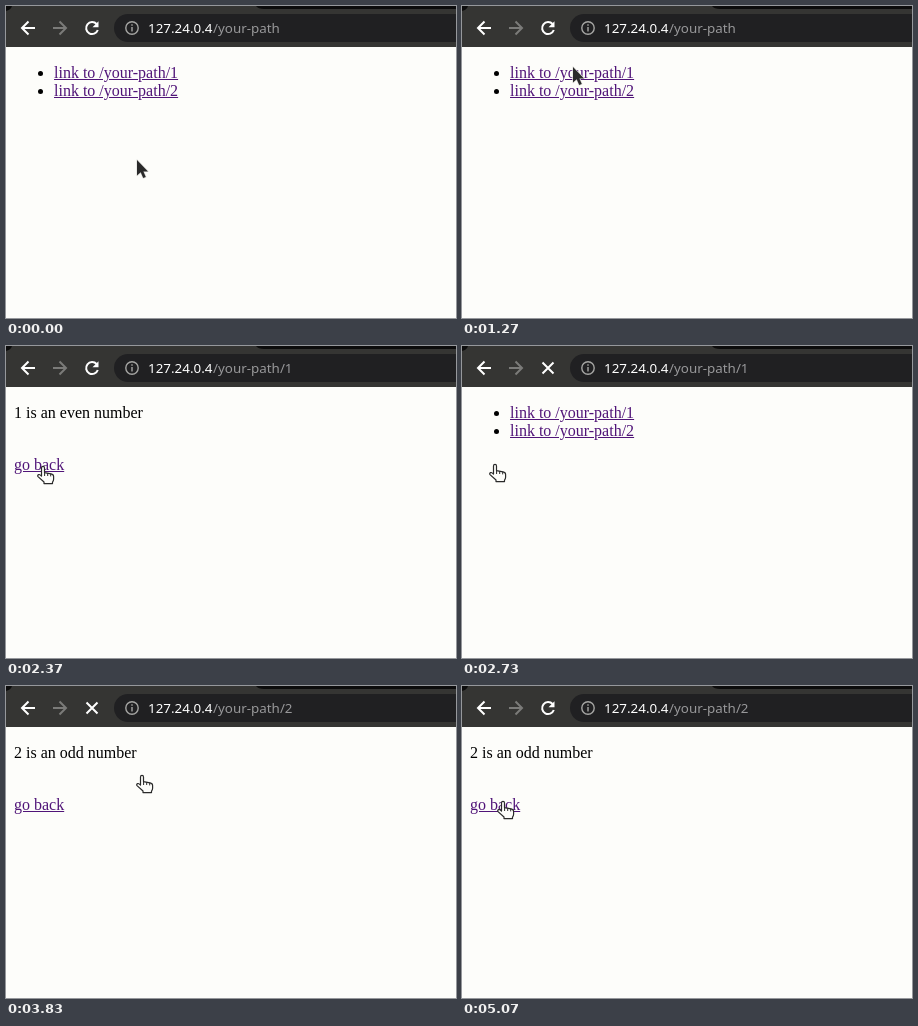
An HTML page that plays this animation: 450 px wide and 312 px high, repeating every 5110 ms.

```html
<!DOCTYPE html>
<html lang="en">
<head>
<meta charset="utf-8">
<title>Links</title>
<style>
  html, body { margin: 0; width: 100%; height: 100%; overflow: hidden; background: #fdfdfa; }
  #stage { position: relative; width: 450px; height: 312px; overflow: hidden; }
  svg { position: absolute; left: 0; top: 0; }
  .page { position: absolute; left: 8px; top: 58px; width: 434px;
          font: 16px/18px "Liberation Serif", "Times New Roman", serif; color: #000; }
  .page ul, .page p { margin: 0; }
  .page ul { padding-left: 40px; }
  .page p + p { margin-top: 34px; }
  u { color: #501478; }
  .url { font: 13.4px "Noto Sans", "Open Sans", sans-serif; }
  [hidden] { display: none; }
</style>
</head>
<body>
<div id="stage">
  <div class="page" id="list">
    <ul><li><u>link to /your-path/1</u></li><li><u>link to /your-path/2</u></li></ul>
  </div>
  <div class="page" id="item" hidden><p id="fact"></p><p><u>go back</u></p></div>

  <svg width="450" height="312" fill="none">
    <rect width="450" height="41" fill="#353533"/>
    <path d="M244 0H450V3H258Q252 3 250 0zM0 0H6Q5 4 0 5z" fill="#0c0c0c"/>
    <rect x="108" y="8" width="360" height="28" rx="14" fill="#202022"/>
    <g stroke="#fff" stroke-width="2">
      <path d="M29 22H16.5M22.5 15.5L16 22l6.5 6.5"/>
      <path d="M47 22H59.5M53.5 15.5L60 22l-6.5 6.5" stroke="#7b7b79"/>
      <g id="reload">
        <path d="M90.6 18A6 6 0 1 0 91.8 24"/>
        <path d="M92.5 15.2V21.2H86.5z" fill="#fff" stroke="none"/>
      </g>
      <path id="stop" d="M80.5 16.5l11 11M91.5 16.5l-11 11"/>
    </g>
    <g stroke="#a5a5a3" stroke-width="1.4">
      <circle cx="126" cy="22" r="6.2"/>
      <path d="M126 21v4.6M126 18.2v1.6"/>
    </g>
    <text class="url" x="142" y="27" fill="#fff">127.24.0.4</text>
    <text class="url" id="path" x="207" y="27" fill="#98989a"></text>

    <g id="arrow" stroke-linejoin="round">
      <path d="M0 0V15.6L3.7 12.3 6.2 18 8.8 16.9 6.4 11.4H11z" fill="#2a2a2a" stroke="#e4e4e0" stroke-width="1.4" paint-order="stroke"/>
    </g>
    <g id="hand" stroke="#2a2a2a" stroke-width="1.2" stroke-linejoin="round">
      <path d="M-1.5 9V.9a1.5 1.5 0 0 1 3 0V5.6L8 6.8q2.6.5 2.6 2.7v2.7q0 1.7-1.1 2.9v1.5H1v-1.6L-5 9.6q-.8-1.5.6-2 1-.3 1.8.5z" fill="#fdfdfa"/>
      <path d="M1.6 5.6V9M4.7 6.2V9M7.7 6.8V9.4" stroke-width="1"/>
    </g>
  </svg>
</div>
<script>
  const LOOP = 5110;
  const $ = id => document.getElementById(id);

  // time, page number (0 = list), address number, loading
  const states = [
    [0, 0, 0, 0], [1300, 0, 0, 1], [1330, 1, 1, 1], [1630, 1, 1, 0],
    [2700, 1, 1, 1], [2730, 0, 1, 1], [2870, 0, 0, 0],
    [3600, 0, 0, 1], [3770, 2, 2, 1], [3870, 2, 2, 0]
  ];

  // time, pointer tip x, y, shape
  const arrow = "arrow", hand = "hand";
  const moves = [
    [0, 131, 154, arrow], [100, 130, 150, arrow], [200, 127, 136, arrow],
    [270, 123, 118, arrow], [330, 119, 102, arrow], [400, 116, 88, hand], [500, 115, 81, hand],
    [630, 114, 80, hand], [730, 113, 79, hand], [1070, 112, 69, hand], [1100, 111, 62, hand],
    [1270, 111, 61, arrow],
    [1630, 109, 63, arrow], [1700, 103, 69, arrow], [1770, 92, 79, arrow], [1830, 80, 90, arrow],
    [1930, 65, 102, arrow], [2030, 51, 114, hand], [2070, 46, 117, hand],
    [2170, 42, 120, hand], [2300, 37, 121, hand], [2470, 33, 119, hand],
    [2870, 36, 122, arrow], [2930, 51, 121, arrow], [3000, 76, 113, arrow],
    [3070, 104, 103, arrow], [3130, 123, 95, arrow], [3200, 132, 91, hand], [3270, 136, 90, hand],
    [3870, 136, 90, arrow],
    [4100, 130, 95, arrow], [4170, 107, 108, arrow], [4230, 80, 122, arrow],
    [4300, 60, 131, arrow], [4370, 53, 129, arrow], [4470, 48, 125, hand], [4600, 44, 121, hand],
    [4700, 43, 119, hand], [4870, 42, 117, hand], [5070, 41, 116, hand]
  ];
  const facts = ["", "1 is an even number", "2 is an odd number"];

  const at = (rows, t) => rows.findLast(row => row[0] <= t);
  const show = (id, on) => $(id).style.display = on ? "" : "none";

  function draw(now) {
    const t = now % LOOP;
    const [, page, address, loading] = at(states, t);
    const [, x, y, shape] = at(moves, t);
    $("list").hidden = page > 0;
    $("item").hidden = !page;
    $("fact").textContent = facts[page];
    $("path").textContent = "/your-path" + (address ? "/" + address : "");
    show("reload", !loading);
    show("stop", loading);
    for (const id of [arrow, hand]) show(id, id === shape);
    $(shape).setAttribute("transform", `translate(${x} ${y})`);
  }

  const start = performance.now();
  function tick() {
    draw(performance.now() - start);
    requestAnimationFrame(tick);
  }
  tick();
</script>
</body>
</html>
```
